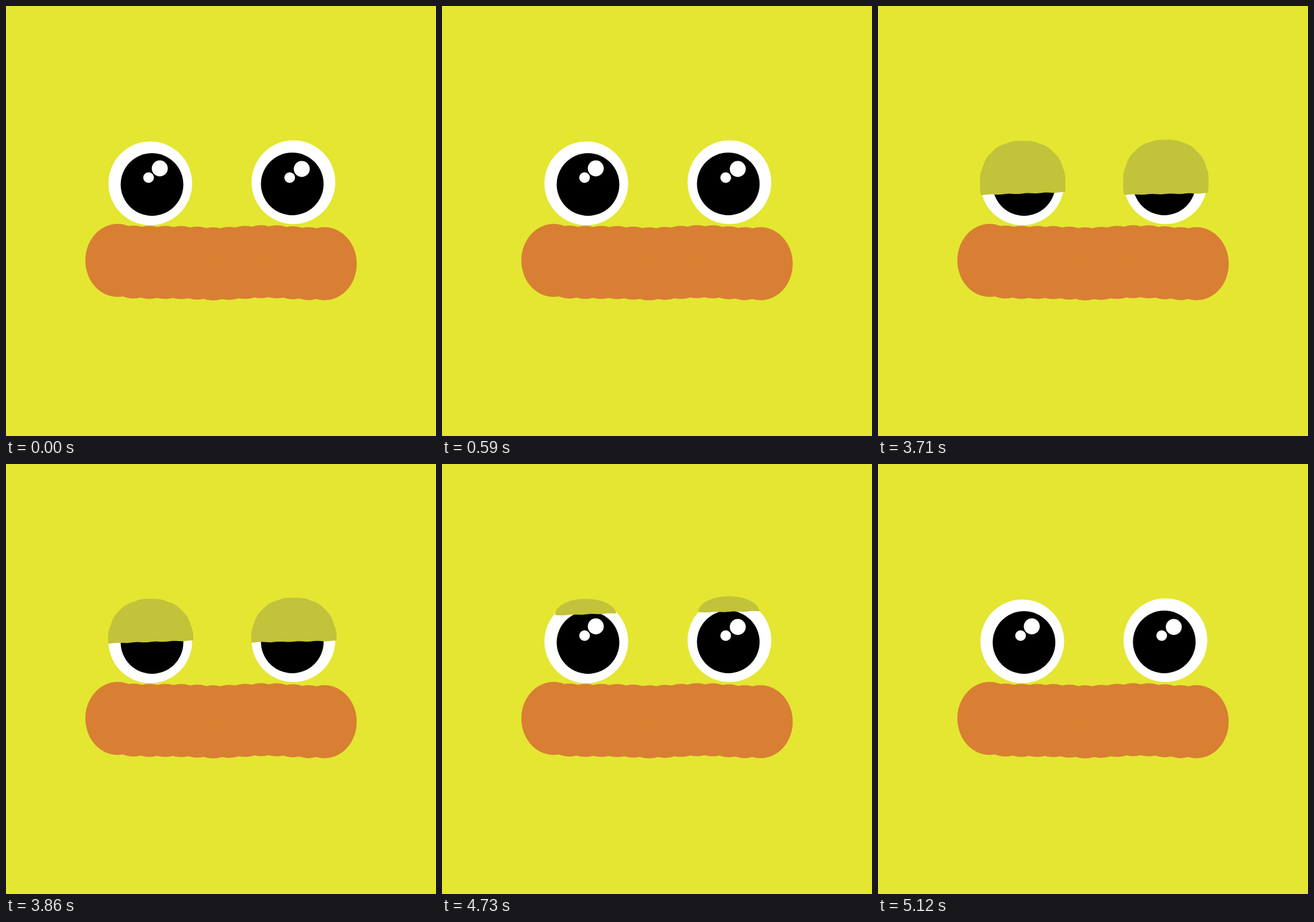
Recreate the animation shown at these times as an HTML page with a canvas. Size 748x748 px, loop 8.42 s.

```html
<!DOCTYPE html>
<html lang="en">
<head>
<meta charset="utf-8">
<title>Blinking duck</title>
<style>
  html, body { margin: 0; width: 100%; height: 100%; overflow: hidden; background: #e4e632; }
  canvas { display: block; width: 748px; height: 748px; }
</style>
</head>
<body>
<canvas id="stage" width="748" height="748"></canvas>
<script>
const ctx = document.getElementById('stage').getContext('2d');
const LOOP = 8420, STEP = 30, POSES = 13, CLOSED = 6;
const BLINKS = [200, 3590, 4730];
const YELLOW = '#e4e632', ORANGE = '#d87f33', LID = '#c2c23b';

// lidY: edge of the lid when it first shows; lidStep: how far it drops per pose
const EYES = [
  { x: 251, y: 308.5, pupil: [254, 310.5], shine: [267.5, 282.5], glint: [248, 298.5],
    lidY: 261.5, lidStep: 16, tilt: -0.033 },
  { x: 500, y: 306.5, pupil: [498, 309.5], shine: [514.5, 283.5], glint: [493.5, 298.5],
    lidY: 257, lidStep: 17.3, tilt: -0.018 }
];

function oval(x, y, rx, ry, color) {
  ctx.fillStyle = color;
  ctx.beginPath();
  ctx.ellipse(x, y, rx, ry, 0, 0, Math.PI * 2);
  ctx.fill();
}

const dot = ([x, y], r, color) => oval(x, y, r, r, color);

function drawEye(eye) {
  dot([eye.x, eye.y], 72.8, '#fff');
  dot(eye.pupil, 54.5, '#000');
  dot(eye.shine, 13.9, '#fff');
  dot(eye.glint, 9.3, '#fff');
}

// A row of brush dabs that starts high, then wavers
function drawBeak() {
  for (let i = 0; i < 14; i++) {
    const waver = 1.9 * Math.min(1, i * i / 36) * Math.cos((i - 6) * 0.95);
    oval(194 + i * 27.7, 446.6 - 4 * Math.exp(-1.2 * i) + waver, 56, 63.5, ORANGE);
  }
}

// Limits drawing to the area above the tilted, slightly ragged lid edge
function clipAbove(eye, edge) {
  ctx.beginPath();
  ctx.moveTo(eye.x + 90, 200);
  ctx.lineTo(eye.x - 90, 200);
  for (let dx = -90; dx <= 90; dx += 3) {
    ctx.lineTo(eye.x + dx, edge + eye.tilt * dx + 0.5 * Math.sin(dx * 1.9));
  }
  ctx.clip();
}

// Hand-painted disc, a little fuller on the diagonals
function drawDisc(eye) {
  ctx.fillStyle = LID;
  ctx.beginPath();
  for (let a = 0; a < Math.PI * 2; a += 0.05) {
    const r = 73.9 + 2.4 * Math.sin(2 * a) ** 2 + 0.9 * Math.abs(Math.sin(8 * a));
    ctx.lineTo(eye.x + 0.7 + r * Math.cos(a), eye.y + 0.3 + r * Math.sin(a));
  }
  ctx.fill();
}

// Drops evenly, then snaps shut
function drawLid(eye, depth) {
  const edge = eye.lidY + eye.lidStep * depth + 30 * (depth / CLOSED) ** 9;
  ctx.save();
  clipAbove(eye, edge);
  if (depth) drawDisc(eye);
  else oval(eye.x - 1, edge, 53, 27, LID);
  ctx.restore();
}

// Lid depth at a time, or -1 while the eyes are open
function depthAt(t) {
  for (const start of BLINKS) {
    const pose = Math.floor((t - start) / STEP);
    if (pose >= 0 && pose < POSES) return CLOSED - Math.abs(CLOSED - pose);
  }
  return -1;
}

function draw(t) {
  ctx.fillStyle = YELLOW;
  ctx.fillRect(0, 0, 748, 748);
  EYES.forEach(drawEye);
  drawBeak();
  const depth = depthAt(t);
  if (depth >= 0) EYES.forEach(eye => drawLid(eye, depth));
}

const begin = performance.now();
function tick() {
  draw((performance.now() - begin) % LOOP);
  requestAnimationFrame(tick);
}
tick();
</script>
</body>
</html>
```
